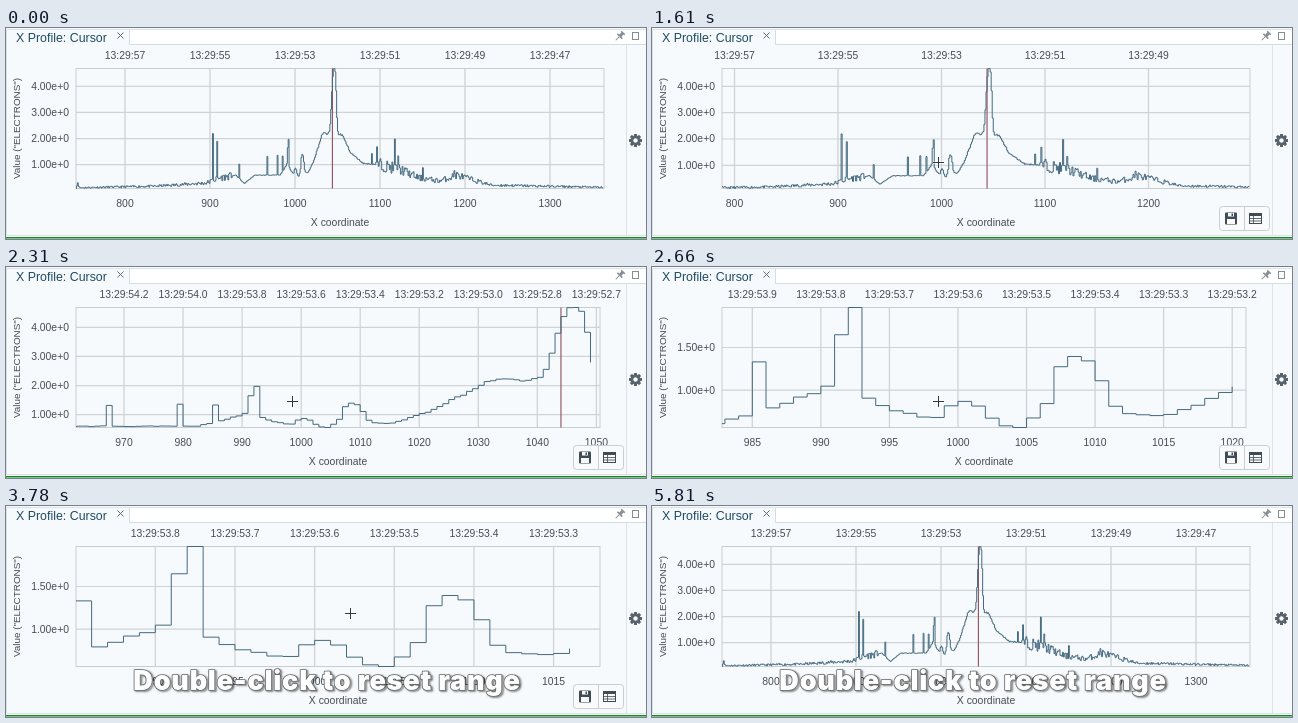
An HTML page with a canvas that plays this animation: 640x211 px, repeating every 5.88 s.

```html
<!DOCTYPE html>
<html lang="en">
<head>
<meta charset="utf-8">
<title>X Profile</title>
<style>
  html, body { margin: 0; width: 100%; height: 100%; overflow: hidden; background: #f7fafc; }
  canvas { display: block; width: 640px; height: 211px; }
</style>
</head>
<body>
<canvas id="stage" width="640" height="211"></canvas>
<script>
const ctx = document.getElementById('stage').getContext('2d');
const LOOP = 5880, TICK = 70;
const SANS = '"Liberation Sans", Arial, sans-serif';
const PLOT = { left: 70, top: 40.5, bottom: 160.5 };
const FIRST = 742, LAST = 1366, MARKER = 1044;

// Slow trend of the profile: [x, value], joined by straight lines.
const trend = [
  [742, .12], [836, .18], [895, .3], [912, .5], [930, .6], [940, .28], [952, .6],
  [982, .6], [990, 1], [997, .68], [1004, .57], [1006, .75], [1015, .7], [1021, 1.1],
  [1032, 2.2], [1055, 2.15], [1065, 1.45], [1080, 1.05], [1100, 1], [1125, .8],
  [1145, .5], [1170, .38], [1190, .6], [1230, .22], [1366, .13]
];
// Peaks on top of it: [center, height, left width, right width].
const peaks = [
  [744, .2, 1], [903, 1.85], [908, 1.4], [934, .55], [967, .72], [979, .75], [985, .57],
  [992, 1.08, 1.3, .7], [1000, .24, 1.4, 1.8], [1008, .66, 1.6, 2.4], [1046, 2.5, 4, 2.7],
  [1090, .4], [1096, .5], [1117, 1], [1121, .6], [1150, .4], [1187, .25]
];

let seed = 11;
const random = () => (seed = (seed * 16807) % 2147483647) / 2147483647;

function interpolate(points, at) {
  if (at <= points[0][0]) return points[0].slice(1);
  for (let i = 1; i < points.length; i++) {
    const a = points[i - 1], b = points[i];
    if (at <= b[0]) {
      const u = (at - a[0]) / (b[0] - a[0]);
      return a.slice(1).map((v, k) => v + (b[k + 1] - v) * u);
    }
  }
  return points[points.length - 1].slice(1);
}

function peakAt(x, [center, height, left = .6, right = left]) {
  const u = Math.abs(x - center) / (x < center ? left : right);
  return height * Math.exp(-(u ** 3));
}
function profileAt(x) {
  const roughness = Math.abs(x - 1010) < 85 ? .04 : .5;
  const base = interpolate(trend, x)[0] * (1 + roughness * (random() - .5));
  return peaks.reduce((sum, peak) => sum + peakAt(x, peak), Math.max(.08, base));
}
const profile = Array.from({ length: LAST - FIRST + 1 }, (_, i) => profileAt(FIRST + i));
const valueOf = x => profile[Math.min(Math.max(x, FIRST), LAST) - FIRST];

// [time, unit under the pointer, log of pixels per unit]
const zoom = [
  [1540, 997.06, Math.log(.85)], [1610, 997.1, Math.log(1.035)], [2030, 998.5, Math.log(3.01)],
  [2660, 998.58, Math.log(13.71)], [2730, 998.61, Math.log(15.93)]
];
const ANCHOR = 286.5, RESET = 4200;
const pointer = [
  [770, 300, 205], [1190, 286.5, 134.5], [2870, 286.5, 134.5], [3500, 344.5, 107.5],
  [4620, 344.5, 107.5], [4970, 337.5, 132.5], [5180, 330, 182], [5320, 326, 206]
];
const shown = { pointer: [770, 5320], toolbar: [770, 5390], caption: [3290, LOOP] };
const isShown = (name, t) => t >= shown[name][0] && t < shown[name][1];

function niceStep(raw) {
  const power = 10 ** Math.floor(Math.log10(raw));
  return power * [1, 2, 5, 10].find(n => n * power >= raw * .9999);
}
function ticks(min, max, step) {
  const list = [];
  for (let i = Math.ceil(min / step); i * step <= max; i++) list.push(i * step);
  return list;
}

function line(points, color, width = 1) {
  ctx.beginPath();
  points.forEach(([x, y]) => ctx.lineTo(x, y));
  ctx.strokeStyle = color;
  ctx.lineWidth = width;
  ctx.stroke();
}
function rect(x, y, w, h, color) {
  ctx.fillStyle = color;
  ctx.fillRect(x, y, w, h);
}
function text(string, x, y, align = 'center', size = 10.4, color = '#454d55') {
  ctx.font = `${size}px ${SANS}`;
  ctx.textAlign = align;
  ctx.textBaseline = 'alphabetic';
  ctx.fillStyle = color;
  ctx.fillText(string, x, y);
}

function timeLabel(x, step) {
  const seconds = 53.62 - (x - 1000) * .0193;
  return '13:29:' + (step >= 100 ? Math.floor(seconds) : seconds.toFixed(1));
}

function drawGear(x, y) {
  ctx.save();
  ctx.translate(x, y);
  ctx.fillStyle = ctx.strokeStyle = '#58636c';
  for (let i = 0; i < 8; i++) {
    ctx.fillRect(-1.5, -6.5, 3, 4);
    ctx.rotate(Math.PI / 4);
  }
  ctx.beginPath();
  ctx.arc(0, 0, 3.7, 0, 7);
  ctx.lineWidth = 2.8;
  ctx.stroke();
  ctx.restore();
}

function drawPin(x, y) {
  const ink = '#868e95';
  ctx.save();
  ctx.translate(x, y);
  ctx.rotate(Math.PI / 4);
  rect(-2.5, -5, 5, 1.5, ink);
  rect(-1.5, -4, 3, 4, ink);
  rect(-3.5, -.5, 7, 1.5, ink);
  rect(-.5, 1, 1, 5, ink);
  ctx.restore();
}

function drawPanel() {
  rect(0, 0, 640, 211, '#f7fafc');
  rect(124, 2, 516, 14, '#ffffff');
  line([[0, 1.5], [640, 1.5]], '#dde3e7');
  line([[123.5, 2], [123.5, 16.5], [640, 16.5]], '#d3dde4');
  line([[620.5, 17], [620.5, 207]], '#dde2e6');
  line([[.5, 2], [.5, 207.5], [640, 207.5]], '#dce1e5');
  rect(0, 209, 640, 1.5, '#128a1e');
  text('X Profile: Cursor', 10, 14, 'left', 12.4, '#1f4a63');
  line([[111.5, 4.5], [117.5, 10.5]], '#5c6b76');
  line([[117.5, 4.5], [111.5, 10.5]], '#5c6b76');
  drawPin(614, 8);
  ctx.strokeStyle = '#868e95';
  ctx.strokeRect(626.5, 4.5, 6, 7);
  drawGear(629.5, 112.5);
}

function drawChart(t) {
  const [unit, logScale] = interpolate(zoom, t < RESET ? t : 0);
  const scale = Math.exp(logScale);
  const min = unit - (ANCHOR - PLOT.left) / scale;
  const stepX = niceStep(528 / scale / 10);
  const right = stepX >= 100 ? 598 : 594;
  const max = min + (right - PLOT.left) / scale;
  const from = Math.floor(min), to = Math.floor(max) - 1;

  const points = [];
  for (let x = from; x <= to; x++) points.push([x, valueOf(x)]);
  const values = points.map(p => p[1]);
  const low = Math.min(...values), high = Math.max(...values);
  const px = x => PLOT.left + (x - min) * scale;
  const py = v => PLOT.bottom - (v - low) / (high - low) * (PLOT.bottom - PLOT.top);

  const grid = '#d0d3d5';
  for (const v of ticks(low, high, niceStep((high - low) / 5))) {
    line([[PLOT.left, py(v)], [right, py(v)]], grid, 1.2);
    text(v.toExponential(2), 63, py(v) + 3.5, 'right');
  }
  for (const x of ticks(min, max, stepX)) {
    line([[px(x), PLOT.top], [px(x), PLOT.bottom]], grid, 1.3);
    text(timeLabel(x, stepX), px(x), 31);
    text(String(x), px(x), 178.5);
  }
  ctx.lineWidth = 1;
  ctx.strokeStyle = '#c9cdd0';
  ctx.strokeRect(PLOT.left, PLOT.top, right - PLOT.left, PLOT.bottom - PLOT.top);

  text('X coordinate', (PLOT.left + right) / 2, 197.5);
  ctx.save();
  ctx.translate(14, 100.5);
  ctx.rotate(-Math.PI / 2);
  text('Value ("ELECTRONS")', 0, 0, 'center', 9.9);
  ctx.restore();

  ctx.save();
  ctx.beginPath();
  ctx.rect(PLOT.left, PLOT.top - 1, right - PLOT.left, PLOT.bottom - PLOT.top + 2);
  ctx.clip();
  line([[px(MARKER), PLOT.top], [px(MARKER), PLOT.bottom]], '#8f4c5a', 1.1);
  const path = [];
  points.forEach(([x, v], i) => {
    if (i) path.push([px(x), py(points[i - 1][1])]);
    path.push([px(x), py(v)]);
  });
  line(path, '#44697f');
  ctx.restore();
}

function drawToolbar() {
  const ink = '#3f4b55', paper = '#f8fafb', border = '#c9ced3';
  ctx.beginPath();
  ctx.roundRect(567.5, 178.5, 50, 24, 3);
  ctx.fillStyle = paper;
  ctx.fill();
  ctx.lineWidth = 1;
  ctx.strokeStyle = border;
  ctx.stroke();
  line([[592.5, 179], [592.5, 202]], border);

  ctx.beginPath();
  ctx.roundRect(573, 184.5, 12, 12, 1);
  ctx.fillStyle = ink;
  ctx.fill();
  rect(576, 185, 6, 3.5, paper);
  rect(579.5, 185.5, 1.5, 2.5, ink);
  rect(575, 191, 8, 5, paper);

  ctx.strokeStyle = ink;
  ctx.strokeRect(597.5, 185.5, 12, 10);
  rect(597, 185, 13, 3, ink);
  for (const y of [190.5, 193]) line([[598, y], [609, y]], ink, .8);
  line([[601.5, 188], [601.5, 195]], ink, .8);
}

function drawPointer(t) {
  const [x, y] = interpolate(pointer, t).map(v => Math.floor(v) + .5);
  for (const [color, width] of [['#ffffffaa', 2.5], ['#30363a', 1]]) {
    line([[x - 5.5, y], [x + 5.5, y]], color, width);
    line([[x, y - 5.5], [x, y + 5.5]], color, width);
  }
}

function drawCaption() {
  const caption = ['Double-click to reset range', 321, 183.5];
  ctx.save();
  ctx.font = '900 27px Inter, "Open Sans", sans-serif';
  ctx.letterSpacing = '0.8px';
  ctx.textAlign = 'center';
  ctx.textBaseline = 'alphabetic';
  ctx.lineJoin = 'round';
  ctx.lineWidth = 1.6;
  ctx.strokeStyle = '#66696b';
  ctx.shadowColor = '#000000a0';
  ctx.shadowBlur = 2;
  ctx.shadowOffsetX = ctx.shadowOffsetY = 1.5;
  ctx.strokeText(...caption);
  ctx.shadowColor = 'transparent';
  ctx.fillStyle = '#fff';
  ctx.fillText(...caption);
  ctx.restore();
}

function draw(t) {
  drawPanel();
  drawChart(t);
  if (isShown('toolbar', t)) drawToolbar();
  if (isShown('pointer', t)) drawPointer(t);
  if (isShown('caption', t)) drawCaption();
}

const start = performance.now();
function frame() {
  const t = Math.max(0, performance.now() - start) % LOOP;
  draw(Math.floor(t / TICK) * TICK);
  requestAnimationFrame(frame);
}
frame();
</script>
</body>
</html>
```
